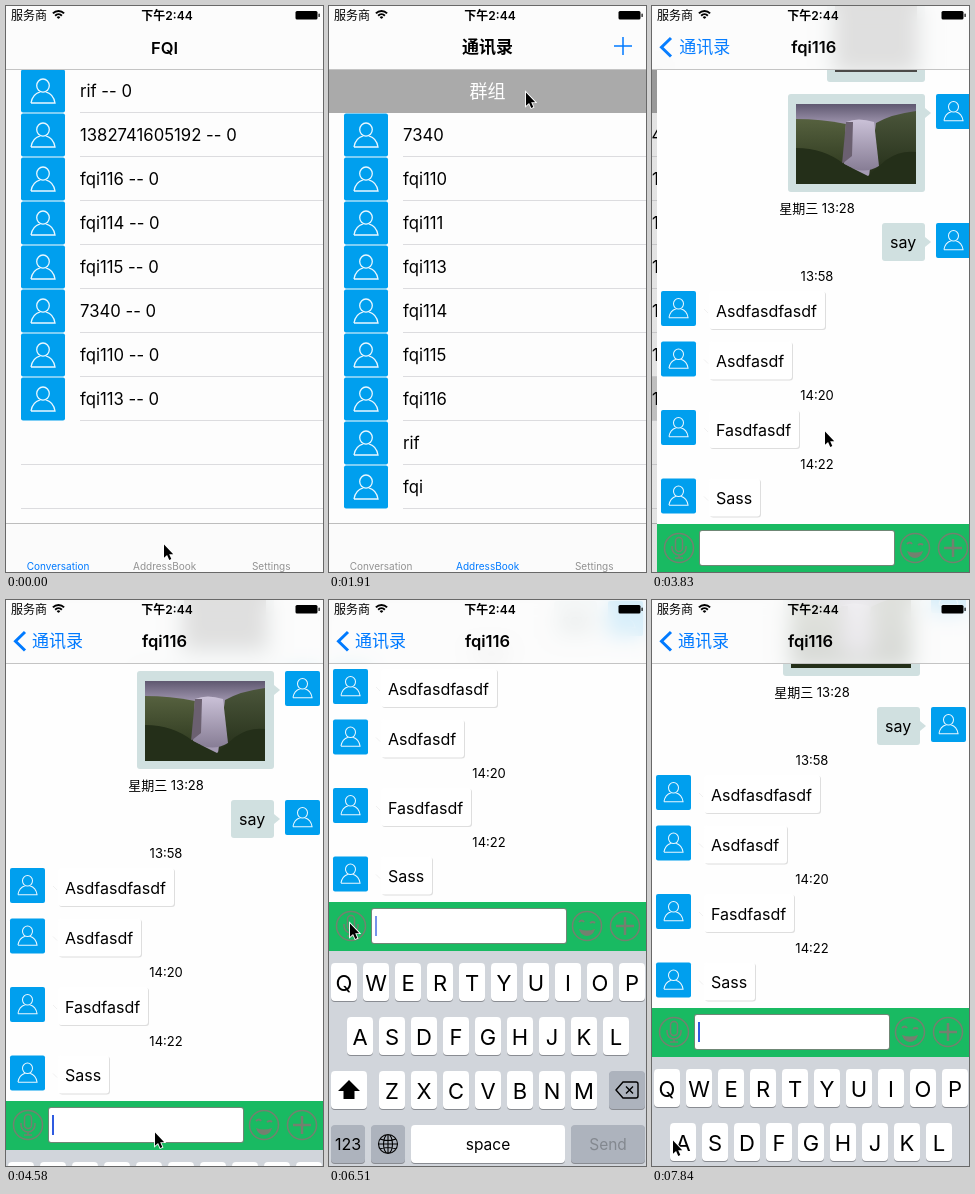
Write an HTML page with a canvas that moves like this. It is 317 px wide and 566 px high and loops after 7990 ms.

```html
<!DOCTYPE html>
<html lang="zh">
<head>
<meta charset="utf-8">
<title>Chat demo</title>
<style>
  html, body { margin: 0; width: 100%; height: 100%; overflow: hidden; background: #fdfdfd; }
  canvas { display: block; width: 317px; height: 566px; }
</style>
</head>
<body>
<canvas id="stage"></canvas>
<script>
const W = 317, H = 566, LOOP = 7990, STEPS = 54, STEP = LOOP / STEPS;
const NAV = 63, TABS = 517, INPUT = 518, INPUT_H = 49, KEYBOARD = 216;
const BLUE = '#007aff', AVATAR = '#009fee', GREEN = '#19ba62', ICON = '#74806f';
const FONT = 'Inter, "Noto Sans CJK SC", "Noto Sans CJK", sans-serif';

const conversations = ['rif', '1382741605192', 'fqi116', 'fqi114', 'fqi115', '7340', 'fqi110', 'fqi113'];
const contacts = ['7340', 'fqi110', 'fqi111', 'fqi113', 'fqi114', 'fqi115', 'fqi116', 'rif', 'fqi'];
const peer = 'fqi116';

// Moments in ms
const TAB = 739, SELECT = 3105, PUSH = 3369, TYPE = 4562, VOICE = 6634, TYPE_AGAIN = 7749;

// Pointer stops: step, x, y
const pointerPath = [
  [0, 157, 537], [6, 157, 537], [7, 155, 540], [10, 135, 380], [13, 196, 85], [15, 196, 85],
  [19, 157, 384], [21, 157, 384], [23, 189, 354], [28, 146, 530], [29, 148, 531], [32, 148, 531],
  [35, 160, 273], [37, 150, 275], [44, 20, 322], [45, 20, 322], [47, 23, 334], [51, 20, 539], [53, 20, 539]
];

const canvas = document.getElementById('stage');
const dpr = window.devicePixelRatio || 1;
canvas.width = W * dpr;
canvas.height = H * dpr;
const ctx = canvas.getContext('2d');
ctx.scale(dpr, dpr);

const clamp = v => Math.max(0, Math.min(1, v));

// Critically damped spring, 0 to 1
function spring(ms) {
  if (ms <= 0) return 0;
  const x = 0.0183 * ms;
  return 1 - (1 + x) * Math.exp(-x);
}

function rect(x, y, w, h, color) {
  ctx.fillStyle = color;
  ctx.fillRect(x, y, w, h);
}

function box(x, y, w, h, r, color) {
  ctx.fillStyle = color;
  ctx.beginPath();
  ctx.roundRect(x, y, w, h, r);
  ctx.fill();
}

// y is the middle of the capital letters
function text(str, x, y, size, { color = '#000', align = 'left', weight = 400 } = {}) {
  ctx.font = `${weight} ${size}px ${FONT}`;
  ctx.fillStyle = color;
  ctx.textAlign = align;
  ctx.fillText(str, x, y + size * 0.365);
}

function stroke(path, color, width) {
  ctx.strokeStyle = color;
  ctx.lineWidth = width;
  ctx.stroke(new Path2D(path));
}

function fill(path, color) {
  ctx.fillStyle = color;
  ctx.fill(new Path2D(path));
}

function at(x, y, draw, scale = 1) {
  ctx.save();
  ctx.translate(x, y);
  ctx.scale(scale, scale);
  draw();
  ctx.restore();
}

function verticalFade(y0, y1, from, to) {
  const fade = ctx.createLinearGradient(0, y0, 0, y1);
  fade.addColorStop(0, from);
  fade.addColorStop(1, to);
  return fade;
}

function avatar(x, y, w, h = w) {
  box(x, y, w, h, 2, AVATAR);
  at(x, y, () => {
    stroke('M22 9.5a6.3 6.6 0 1 1 0 13.2a6.3 6.6 0 1 1 0-13.2z' +
      'M10 33.5C11 27 15 23.5 19 22.3M25 22.3C29 23.5 33 27 34 33.5H10', '#e9f7ff', 1.3);
  }, w / 44);
}

function row(label, top) {
  rect(74, top + 43, W - 74, 1, '#dcdcdf');
  avatar(15, top + 0.5, 44, 43);
  text(label, 74, top + 22, 16.7);
}

function tabBar(active) {
  rect(0, TABS, W, H - TABS, '#fbfbfb');
  rect(0, TABS, W, 1, '#bdbdbd');
  ['Conversation', 'AddressBook', 'Settings'].forEach((label, i) =>
    text(label, 52 + 106.6 * i, 560, 10, { align: 'center', color: i === active ? BLUE : '#929292' }));
}

function conversationView() {
  conversations.forEach((name, i) => row(name + ' -- 0', NAV + 44 * i));
  for (const y of [458, 502]) rect(15, y, W - 15, 1, '#dcdcdf');
  tabBar(0);
}

function contactView(selected) {
  rect(0, NAV, W, 44, '#aaa');
  text('群组', 158.5, 85.5, 18, { color: '#fff', align: 'center' });
  contacts.forEach((name, i) => {
    const top = NAV + 44 * (i + 1);
    if (selected && name === peer) rect(0, top, W, 44, '#d4d4d4');
    row(name, top);
  });
  tabBar(1);
}

function photo(x, y) {
  ctx.save();
  ctx.beginPath();
  ctx.rect(x, y, 120, 80);
  ctx.clip();
  ctx.translate(x, y);
  rect(0, 0, 120, 80, verticalFade(0, 22, '#5f5870', '#a59bb4'));
  fill('M0 15Q25 15 50 20L58 80H0z', verticalFade(15, 70, '#56613f', '#2c371d'));
  fill('M120 7Q96 10 80 19L72 80H120z', verticalFade(8, 70, '#4a553a', '#26301a'));
  fill('M50 18Q62 13 78 18L83 62Q66 72 48 60z', verticalFade(15, 68, '#cbc2d8', '#857b93'));
  fill('M50 18L57 18L56 52L46 60z', '#6b6070');
  fill('M0 44Q28 44 48 60L72 72L90 56Q104 46 120 48V80H0z', '#242f19');
  ctx.restore();
}

function sentBubble(x, y, w, h, tailY) {
  box(x, y, w, h, 3, '#d0e0e0');
  fill(`M${x + w} ${y + tailY - 5}l6 5l-6 5z`, '#d0e0e0');
}

function received(str, y, w) {
  avatar(4, y, 35);
  box(53, y + 1, w - 1, 38, 3, '#dedede');
  box(52, y, w - 1, 38, 3, '#fff');
  stroke(`M51 ${y + 22}l-4-4`, '#f0f0f0', 1);
  text(str, 59, y + 20, 16);
}

function messages() {
  sentBubble(170, -80, 98, 156, 20);
  rect(178, -70, 82, 136, '#4b4a48');
  sentBubble(131, 88, 137, 98, 19);
  photo(139, 98);
  avatar(279, 88, 35);
  sentBubble(225, 217, 43, 38, 19);
  text('say', 233, 236.5, 16);
  avatar(279, 217, 35);
  received('Asdfasdfasdf', 285, 117);
  received('Asdfasdf', 335.5, 84);
  received('Fasdfasdf', 404, 91);
  received('Sass', 472.5, 52);
  [['星期三 13:28', 202], ['13:58', 270.5], ['14:20', 389.5], ['14:22', 458]].forEach(([label, y]) =>
    text(label, 160, y, 13, { align: 'center' }));
}

const RING = 'M0-14.5a14.5 14.5 0 1 1 0 29a14.5 14.5 0 1 1 0-29z';

function barIcon(x, y, lines, width = 1.5, solid = '') {
  at(x, y, () => {
    stroke(RING, ICON, 1.5);
    stroke(lines, ICON, width);
    fill(solid, ICON);
  });
}

function inputBar(top, voice, caret) {
  rect(0, top, W, INPUT_H, GREEN);
  const mid = top + 24;
  if (voice) {
    let keys = '';
    for (let r = 0; r < 3; r++)
      for (let c = 0; c < 5; c++) keys += `M${-9 + c * 4} ${-6 + r * 4}h2.5v2.5h-2.5z`;
    barIcon(22, mid, 'M-6 7.5h12', 2, keys);
    box(42, top + 6, 196, 36, 3, '#b3b3b3');
    text('按住说话', 140, mid, 16, { color: '#222', align: 'center' });
  } else {
    barIcon(22, mid, 'M-3.5-7a3.5 3.5 0 0 1 7 0v7a3.5 3.5 0 0 1-7 0zM-7-2v2a7 7 0 0 0 14 0v-2M0 7v3M-4 10h8');
    box(42, top + 6, 196, 36, 3, '#6f8775');
    box(43, top + 7, 194, 34, 2, '#fff');
    ctx.globalAlpha = caret;
    rect(46, top + 14, 2, 20, '#2f5be0');
    ctx.globalAlpha = 1;
  }
  barIcon(258, mid, 'M-8-4q3-3 5 0M3-3q3-2 5 0', 2, 'M-8 3Q0 6 8 3Q6 10 0 10Q-6 10-8 3z');
  barIcon(296, mid, 'M-9 0h18M0-9v18', 2.5);
}

function key(x, y, w, label, size = 22, bg = '#fff', color = '#000') {
  box(x, y + 1, w, 38, 4, '#898c92');
  box(x, y, w, 38, 4, bg);
  text(label, x + w / 2, y + 19.5, size, { align: 'center', color });
}

function keyboard(top) {
  const gray = '#adb3bd';
  rect(0, top, W, KEYBOARD, '#d1d5db');
  [['QWERTYUIOP', 2], ['ASDFGHJKL', 18], ['ZXCVBNM', 50]].forEach(([letters, x], r) =>
    [...letters].forEach((ch, i) => key(x + 32 * i, top + 12 + 54 * r, 26, ch)));
  key(2, top + 120, 36, '');
  key(280, top + 120, 36, '', 16, gray);
  key(2, top + 174, 34, '123', 16, gray);
  key(42, top + 174, 34, '', 16, gray);
  key(82, top + 174, 154, 'space', 15.5);
  key(242, top + 174, 74, 'Send', 15.5, gray, '#83888f');
  at(20, top + 139, () => fill('M0-10L11 1H5.5V9H-5.5V1H-11z', '#000'));
  at(298, top + 139, () => stroke('M-11 0L-4-8H9q2 0 2 2V6q0 2-2 2H-4zM-1-3.5l7 7M6-3.5l-7 7', '#000', 1.4));
  at(59, top + 193, () => stroke('M0-9.5a9.5 9.5 0 1 1 0 19a9.5 9.5 0 1 1 0-19zM0-9.5a4.5 9.5 0 1 1 0 19' +
    'a4.5 9.5 0 1 1 0-19zM0-9.5v19M-9.5 0h19M-8-5q8 3 16 0M-8 5q8-3 16 0', '#000', 1.1));
}

function chatView(t, lift) {
  rect(0, NAV, W, H - NAV, '#fefefe');
  at(0, -lift, messages);
  const voice = t >= VOICE && t < TYPE_AGAIN;
  const focusedAt = t >= TYPE_AGAIN ? TYPE_AGAIN : TYPE;
  const phase = ((t - focusedAt) % 1000) / 1000;
  const caret = t < TYPE ? 0 : Math.max(clamp(1 - (phase - 0.5) / 0.17), clamp((phase - 0.85) / 0.15));
  inputBar(INPUT - lift, voice, caret);
  if (lift > 0) keyboard(INPUT + INPUT_H - lift);
}

function navBar(t, p) {
  ctx.save();
  ctx.beginPath();
  ctx.rect(0, 0, W, NAV);
  ctx.clip();
  if (p > 0) {
    // Translucent bar: the messages beneath shine through, blurred
    ctx.filter = `blur(${10 * dpr}px)`;
    ctx.drawImage(canvas, 0, 0, W, H);
    ctx.filter = 'none';
  }
  rect(0, 0, W, NAV, p > 0 ? 'rgba(252,252,252,.84)' : '#fcfcfc');
  ctx.restore();
  rect(0, NAV, W, 1, '#c4c4c4');

  const title = { align: 'center', weight: 600 };
  if (t < TAB) return text('FQI', 158.5, 41.5, 16.5, title);
  ctx.globalAlpha = clamp(1 - 2.5 * p);
  text('通讯录', 158.5 - 80 * p, 41, 17, title);
  ctx.globalAlpha = clamp(1 - 1.5 * p);
  stroke('M285 40H303M294 31V49', BLUE, 1.5);
  ctx.globalAlpha = p * p;
  stroke('M19 32L9.5 41.2L19 50.5', BLUE, 3);
  text('通讯录', 26 + 80 * (1 - p), 41, 17, { color: BLUE });
  ctx.globalAlpha = p;
  text(peer, 158.5 + 192 * (1 - p), 41, 16.5, title);
  ctx.globalAlpha = 1;
}

function statusBar() {
  text('服务商', 5, 9.5, 12);
  for (const r of [1.5, 4.7, 7.9]) {
    ctx.beginPath();
    ctx.arc(52.5, 13, r, -Math.PI * 0.75, -Math.PI * 0.25);
    ctx.strokeStyle = '#000';
    ctx.lineWidth = 2;
    ctx.stroke();
  }
  text('下午2:44', 161, 9.5, 12, { align: 'center', weight: 600 });
  box(289.5, 5, 22, 8.5, 1.5, '#000');
  box(312.5, 7.5, 1.2, 3.5, 0.6, '#000');
}

function pointer(step) {
  const i = Math.max(1, pointerPath.findIndex(([s]) => s >= step));
  const [s0, x0, y0] = pointerPath[i - 1], [s1, x1, y1] = pointerPath[i];
  const k = (step - s0) / (s1 - s0);
  const arrow = 'M0 0V15L3.5 11.8L6 17.5L8.3 16.5L5.9 11H10.5z';
  at(Math.round(x0 + (x1 - x0) * k) + 1, Math.round(y0 + (y1 - y0) * k) + 1.5, () => {
    stroke(arrow, '#fff', 2);
    fill(arrow, '#000');
  }, 0.88);
}

function render(step) {
  const t = step * STEP;
  const progress = spring(t - PUSH), p = progress > 0.998 ? 1 : progress;
  const lift = Math.round(KEYBOARD * (spring(t - TYPE) - spring(t - VOICE) + spring(t - TYPE_AGAIN)));
  const edge = Math.round((1 - p) * W);

  rect(0, 0, W, H, '#fdfdfd');
  if (p < 1) {
    at(Math.floor(-0.3 * p * W), 0, () => t < TAB ? conversationView() : contactView(t >= SELECT));
    rect(0, NAV, W, H - NAV, `rgba(0,0,0,${0.1 * p})`);
  }
  if (p > 0) {
    const shade = ctx.createLinearGradient(edge - 9, 0, edge, 0);
    shade.addColorStop(0, 'rgba(0,0,0,0)');
    shade.addColorStop(1, `rgba(0,0,0,${0.25 * (1 - p)})`);
    rect(edge - 9, NAV, 9, H - NAV, shade);
    at(edge, 0, () => chatView(t, lift));
  }
  navBar(t, p);
  statusBar();
  pointer(step);
}

// The screen is refreshed in even steps, as in a screen recording
let shown = -1;
const start = performance.now();
function tick() {
  const t = (performance.now() - start) % LOOP;
  const step = Math.min(STEPS - 1, Math.floor((t + 15) / STEP));
  if (step !== shown) render(shown = step);
  requestAnimationFrame(tick);
}
tick();
</script>
</body>
</html>
```
